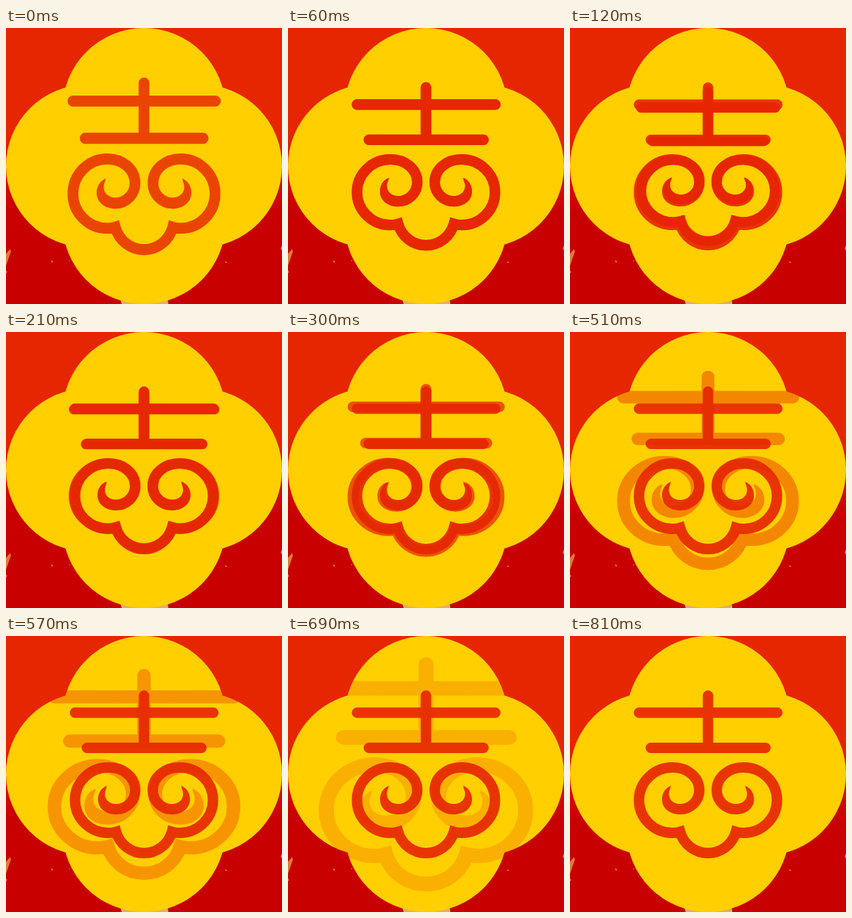
Recreate the animation shown at these times as an HTML page. Size 396 by 396 pixels, loop 0.88 s.

```html
<!DOCTYPE html>
<html lang="en">
<head>
<meta charset="utf-8">
<title>Lucky flower pulse</title>
<style>
  html, body { margin: 0; width: 100%; height: 100%; overflow: hidden; background: #c80000; }
  svg { display: block; width: 100%; height: 100%; }
</style>
</head>
<body>
<svg viewBox="0 0 396 396">
  <defs>
    <linearGradient id="sky" gradientUnits="userSpaceOnUse" x1="0" y1="150" x2="0" y2="265">
      <stop stop-color="#e62600"/>
      <stop offset="1" stop-color="#c80000"/>
    </linearGradient>
    <g id="curl">
      <path fill="none" stroke="#e62600" stroke-width="15"
        d="M158 248.5A27.5 27 0 0 0 185.5 221.5C185.5 202 168 188.5 147 188.5A48 47 0 0 0 99 235.5A48 47 0 0 0 147 282.5Q153 282.5 158 281A41.5 41.5 0 0 0 198 311.5H198.5"/>
      <path fill="#e62600"
        d="M159 256H158C143 256 132 247 132 234.5C132 225 137 218 144.5 215C144.500 219 142 221 142 226C141.500 235 149 241 158 241H159Z"/>
    </g>
    <g id="sign">
      <path stroke="#e62600" stroke-width="15" stroke-linecap="round" d="M198 85.500V160M99 110H297.500M116 160.500H280.500"/>
      <use href="#curl"/>
      <use href="#curl" transform="matrix(-1 0 0 1 396 0)"/>
    </g>
  </defs>

  <rect width="396" height="396" fill="url(#sky)"/>
  <g fill="#dd7a3a">
    <path d="M0 324L6 317L7 321L0 341ZM0 348L2 350L0 352ZM396 312L394 316L396 320Z"/>
    <path d="M64 333L68 335L66 337ZM90 334L92 333V335ZM314 334L318 337L315 337Z"/>
    <path fill="#e2ae62" d="M164 390H232L233 396H166Z"/>
  </g>
  <g fill="#ffcf00">
    <circle cx="198" cy="117" r="117"/>
    <circle cx="198" cy="279" r="117"/>
    <circle cx="117" cy="198" r="117"/>
    <circle cx="279" cy="198" r="117"/>
  </g>
  <use id="pulse" href="#sign"/>
  <use id="base" href="#sign" opacity=".91"/>
</svg>
<script>
  const LOOP = 880, STEP = 30, LAST = 810;
  const pulse = document.getElementById('pulse');
  const base = document.getElementById('base');

  // Each key: time, horizontal scale, vertical scale, opacity
  const keys = [
    [0, 1.03, 1.058, 0.81],
    [120, 0.97, 0.95, 1],
    [420, 1.115, 1.083, 0.54],
    [690, 1.445, 1.394, 0.175],
    [LAST, 1.592, 1.532, 0]
  ];

  function sample(t) {
    const i = Math.max(1, keys.findIndex(key => key[0] >= t));
    const [from, to] = [keys[i - 1], keys[i]];
    const k = (t - from[0]) / (to[0] - from[0]);
    return from.map((v, n) => v + (to[n] - v) * k);
  }

  function draw() {
    const elapsed = performance.now() % LOOP;
    const t = Math.min(LAST, Math.floor(elapsed / STEP) * STEP);
    const [, sx, sy, opacity] = sample(t);
    pulse.setAttribute('transform', `translate(198 198.5) scale(${sx} ${sy}) translate(-198 -198.5)`);
    pulse.setAttribute('opacity', opacity);
    // The resting sign stays behind once the shrinking one passes full size
    base.setAttribute('visibility', t < 60 ? 'hidden' : 'visible');
    requestAnimationFrame(draw);
  }
  draw();
</script>
</body>
</html>
```
